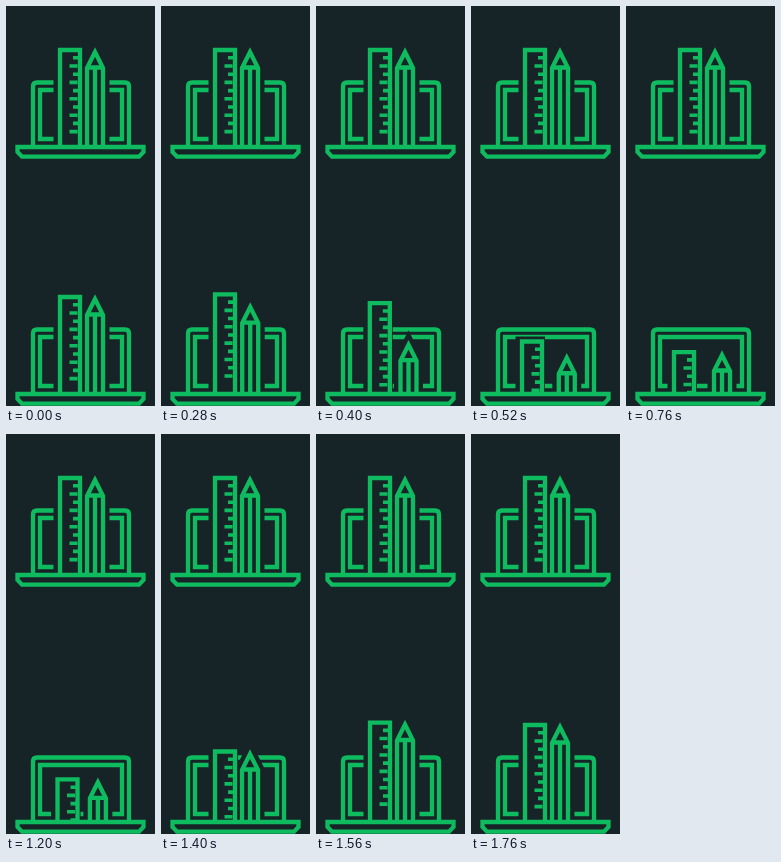
Write an HTML page with a canvas that moves like this. It is 149 px wide and 400 px high and loops after 2.48 s.

```html
<!DOCTYPE html>
<html lang="en">
<head>
<meta charset="utf-8">
<title>Design tools</title>
<style>
  html, body { margin: 0; height: 100%; overflow: hidden; background: #172427; }
  canvas { display: block; width: 149px; height: 400px; }
</style>
</head>
<body>
<canvas></canvas>
<script>
const W = 149, H = 400, LOOP = 2480, STEP = 40;
const BG = '#172427', GREEN = '#0ebc5f';
const canvas = document.querySelector('canvas');
const ctx = canvas.getContext('2d');
const dpr = window.devicePixelRatio || 1;
canvas.width = W * dpr;
canvas.height = H * dpr;

const laptop = new Path2D('M27 140V80.5q0-4 4-4H119q4 0 4 4V140M34 84H116V133H34Z');
const tray = new Path2D('M11.5 141H137.5V146L133 150.7H16L11.5 146Z');

const ruler = {
  body: new Path2D('M54 44H74V260H54Z'),
  gap: new Path2D('M47.5 39H77V260H47.5Z'),
  marks: new Path2D()
};
for (let i = 0; i < 10; i++) {
  ruler.marks.rect(i % 2 ? 63.5 : 67, 50 + i * 8.2, 8, 3.6);
}
const pencil = {
  body: new Path2D('M81 260V62L89 46L97 62V260Z'),
  lines: new Path2D('M81 61.5H97M89 62V260')
};

const progress = (t, a, b) => Math.min(1, Math.max(0, (t - a) / (b - a)));

function smooth(p) {
  return p < .5 ? 2 * p * p : 1 - 2 * (1 - p) ** 2;
}

// Pulls back slightly before leaving and overshoots on arrival.
function swing(p) {
  if (p > .5) return 1 - swing(1 - p);
  const u = 2 * p;
  return u * u * (2.7 * u - 1.7) / 2;
}

// Leaves gently and overshoots on arrival.
const rise = p => p < .5 ? 8 * p ** 4 : swing(p);

function stroke(path, color = GREEN, width = 4.3) {
  ctx.strokeStyle = color;
  ctx.lineWidth = width;
  ctx.stroke(path);
}

function fill(path, color) {
  ctx.fillStyle = color;
  ctx.fill(path);
}

function at([x, y], draw) {
  ctx.save();
  ctx.translate(x, y);
  draw();
  ctx.restore();
}

function icon(top, rulerPos, pencilPos) {
  at([0, top], () => {
    stroke(laptop);
    ctx.save();
    ctx.beginPath();
    ctx.rect(0, 0, W, 140);
    ctx.clip();
    at(rulerPos, () => fill(ruler.gap, BG));
    at(pencilPos, () => {
      fill(pencil.body, BG);
      stroke(pencil.body, BG, 13);
    });
    at(rulerPos, () => {
      stroke(ruler.body);
      fill(ruler.marks, GREEN);
    });
    at(pencilPos, () => {
      stroke(pencil.body);
      stroke(pencil.lines);
    });
    ctx.restore();
    stroke(tray);
  });
}

function frame(now) {
  const t = Math.floor(now % LOOP / STEP) * STEP;
  const backX = smooth(progress(t, 1080, 1300));
  const backY = rise(progress(t, 1075, 1720));
  const rulerPos = [
    -6 * (smooth(progress(t, 360, 680)) - backX),
    55 * (swing(progress(t, 167, 772)) - backY)
  ];
  const pencilPos = [
    7 * (smooth(progress(t, 240, 560)) - backX),
    56 * (swing(progress(t, 25, 665)) - backY)
  ];
  ctx.setTransform(dpr, 0, 0, dpr, 0, 0);
  ctx.fillStyle = BG;
  ctx.fillRect(0, 0, W, H);
  icon(0, [0, 0], [0, 0]);
  icon(247, rulerPos, pencilPos);
}

let start;
function tick(now) {
  start ??= now;
  frame(now - start);
  requestAnimationFrame(tick);
}
frame(0);
requestAnimationFrame(tick);
</script>
</body>
</html>
```
